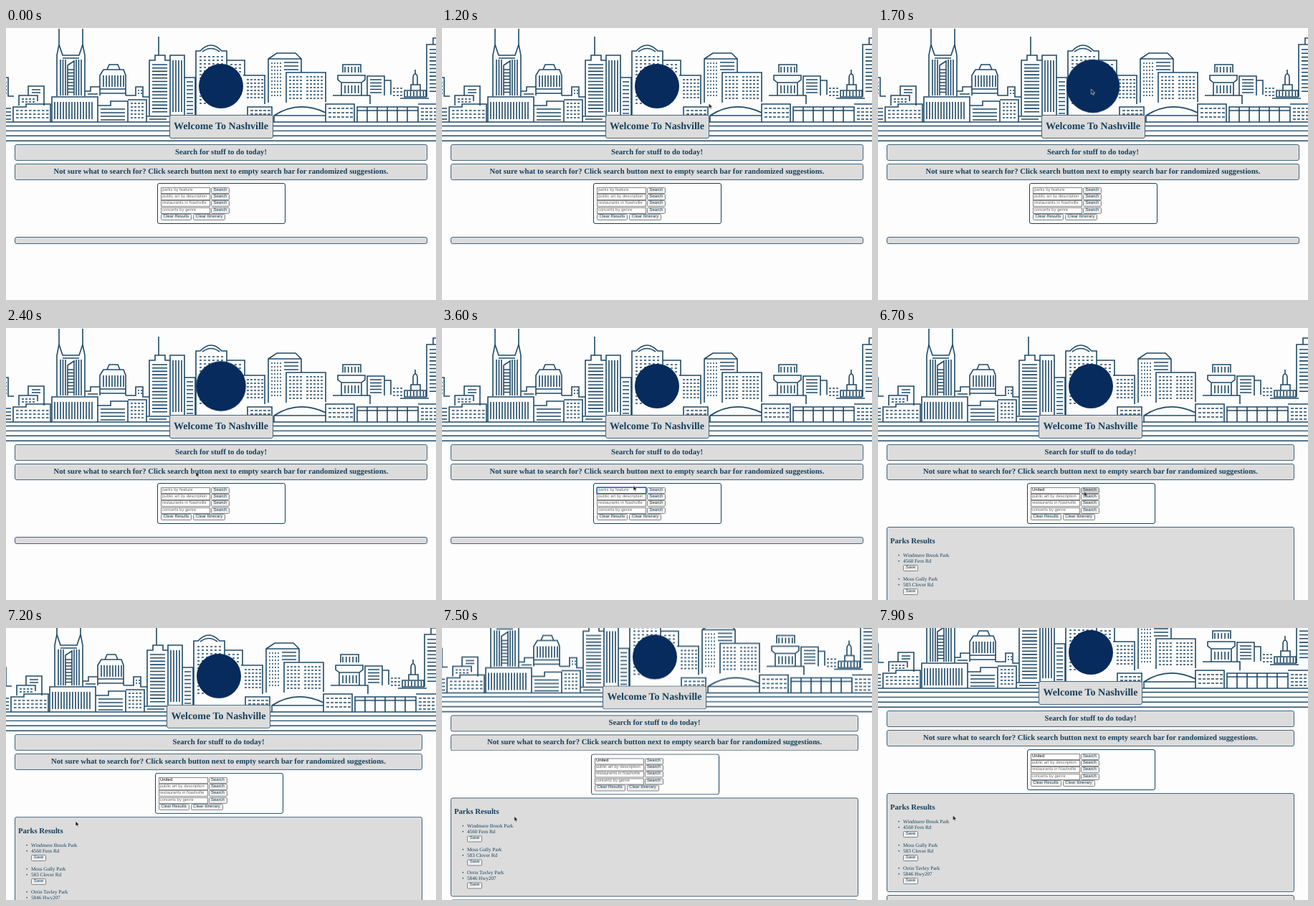
Animation of 600 by 379 pixels, one loop 8000 ms. Source, as an HTML page:

```html
<!DOCTYPE html>
<html lang="en">
<head>
<meta charset="utf-8">
<title>Welcome To Nashville</title>
<style>
:root { --ink: #17405b; --line: #1f4a68; --edge: #456479; --loop: 8s infinite; }
html, body { margin: 0; width: 100%; height: 100%; overflow: hidden; background: #fdfdfd; }
#stage { position: relative; width: 600px; height: 379px; overflow: hidden; text-rendering: geometricPrecision; }
#page {
  position: absolute; left: 0; top: 0; width: 600px; height: 500px;
  color: var(--ink); font: 7.15px/8px "Liberation Serif", "Times New Roman", serif;
  animation: narrow var(--loop) step-end, scroll var(--loop) linear;
}
#page * { box-sizing: border-box; }
#sky {
  position: absolute; left: 50%; top: 0; width: 600px; height: 162px; margin-left: -300px;
  overflow: visible; fill: none; stroke: var(--line); stroke-width: 1.6;
}
#emblem {
  position: absolute; left: 50%; top: 50px; width: 62px; height: 62px; margin-left: -31px;
  border-radius: 50%; background: #062b5c; animation: grow var(--loop) linear;
}
h1, h2, h3 { margin: 0; font-weight: bold; white-space: nowrap; }
.panel {
  position: absolute; left: 12px; right: 12px;
  background: #dcdcdc; border: 1px solid var(--edge); border-radius: 3px;
}
h1.panel {
  left: 50%; right: auto; top: 121px; width: 145px; height: 33px; margin-left: -72.5px;
  font-size: 14.05px; line-height: 31px; text-align: center;
}
h2.panel { height: 23px; font-size: 10.68px; line-height: 20.5px; text-align: center; }
#form {
  left: 50%; right: auto; top: 216px; width: 179px; height: 57px; margin-left: -89px;
  background: #fdfdfd; border-color: var(--ink);
  font: 5.95px/8px "Liberation Sans", Arial, sans-serif;
}
.row { position: absolute; left: 4px; height: 9px; white-space: nowrap; }
.field, .btn { position: absolute; top: 0; height: 9px; border: 1px solid #848484; line-height: 7.5px; }
.field { left: 0; width: 69px; padding-left: 1px; background: #fff; color: #666; }
.btn { background: #efefef; border-radius: 1.5px; text-align: center; }
.row .btn { left: 70px; width: 26px; }
#first { animation: focus var(--loop) step-end; }
#hint { animation: hint var(--loop) step-end; }
#typed { position: absolute; left: 1px; color: #000; animation: typed var(--loop) step-end; }
#typed i { font-style: normal; animation: letter var(--loop) step-end; }
#go { animation: hover var(--loop) step-end; }
#empty { top: 291px; height: 10px; animation: before var(--loop) step-end; }
#results, #more { animation: after var(--loop) step-end; }
#results { top: 277px; height: 138px; }
#more { top: 419px; height: 80px; }
h3 { position: absolute; left: 4px; top: 13px; font-size: 10.68px; line-height: 13px; }
.place { position: absolute; left: 22px; white-space: nowrap; }
.place div::before { content: "•"; position: absolute; left: -7px; }
.place .btn { top: 17px; width: 21px; font: 5.95px/7.5px "Liberation Sans", Arial, sans-serif; }
#cursor { position: absolute; left: 0; top: 0; width: 8px; height: 12px; overflow: visible; animation: move var(--loop) linear; }

@keyframes narrow { 0% { width: 600px } 81.25%, 100% { width: 593px } }
@keyframes before { 0% { visibility: visible } 81.25%, 100% { visibility: hidden } }
@keyframes after { 0% { visibility: hidden } 81.25%, 100% { visibility: visible } }
@keyframes hint { 0% { visibility: visible } 53.75%, 100% { visibility: hidden } }
@keyframes typed { 0% { opacity: 0 } 53.75%, 100% { opacity: 1 } }
@keyframes letter { 0% { visibility: hidden } 50%, 100% { visibility: visible } }
@keyframes focus {
  0%, 80.6%, 100% { box-shadow: none; border-color: #848484 }
  33.75% { box-shadow: 0 0 0 .6px #1b62c4; border-color: #1b62c4 }
}
@keyframes hover { 0%, 85%, 100% { background: #efefef } 78% { background: #d2d2d2 } }
@keyframes scroll {
  0%, 85% { transform: translateY(0) }
  87.5% { transform: translateY(-4px) }
  90% { transform: translateY(-14px) }
  92.5% { transform: translateY(-34px) }
  95%, 100% { transform: translateY(-47px) }
}
@keyframes grow {
  0%, 17.5% { transform: scale(1) }
  21.25% { transform: scale(1.2) }
  25.6% { transform: scale(1.37); animation-timing-function: ease }
  37%, 100% { transform: scale(1) }
}
@keyframes move {
  0%, 2.49% { transform: translate(640px, 338px) }
  2.5% { transform: translate(580px, 335px) }
  12.5% { transform: translate(420px, 120px) }
  17.5% { transform: translate(325px, 90px) }
  21.25% { transform: translate(297.5px, 85px) }
  23.75% { transform: translate(297px, 90px) }
  25.6% { transform: translate(290px, 125px) }
  30% { transform: translate(265px, 200px) }
  33.75%, 36.25% { transform: translate(256px, 228px) }
  41.25%, 73.2% { transform: translate(267px, 219.5px) }
  78.75% { transform: translate(290px, 228px) }
  83.75% { transform: translate(288px, 227.5px) }
  89.4%, 90% { transform: translate(97px, 269px) }
  95% { transform: translate(102px, 260px) }
  98.75%, 100% { transform: translate(104.5px, 261px) }
}
</style>
</head>
<body>
<div id="stage">
  <div id="page">
    <svg id="sky"><path id="city"/><path id="river" stroke-width="1.4"/></svg>
    <div id="emblem"></div>
    <h1 class="panel">Welcome To Nashville</h1>
    <h2 class="panel" style="top:162px">Search for stuff to do today!</h2>
    <h2 class="panel" style="top:189px">Not sure what to search for? Click search button next to empty search bar for randomized suggestions.</h2>
    <div class="panel" id="form">
      <div class="row" style="top:4.5px">
        <div class="field" id="first"><span id="typed"></span><span id="hint">parks by feature</span></div>
        <div class="btn" id="go">Search</div>
      </div>
      <div class="row" style="top:14px"><div class="field">public art by description</div><div class="btn">Search</div></div>
      <div class="row" style="top:23px"><div class="field">restaurants in Nashville</div><div class="btn">Search</div></div>
      <div class="row" style="top:32.5px"><div class="field">concerts by genre</div><div class="btn">Search</div></div>
      <div class="btn" style="left:4px;top:42px;width:43px">Clear Results</div>
      <div class="btn" style="left:49px;top:42px;width:45px">Clear Itinerary</div>
    </div>
    <div class="panel" id="empty"></div>
    <div class="panel" id="results">
      <h3>Parks Results</h3>
      <div class="place" style="top:35px"><div>Windmere Brook Park</div><div>4560 Fern Rd</div><span class="btn">Save</span></div>
      <div class="place" style="top:67.5px"><div>Moss Gully Park</div><div>583 Clover Rd</div><span class="btn">Save</span></div>
      <div class="place" style="top:100px"><div>Orrin Tavley Park</div><div>5846 Hwy207</div><span class="btn">Save</span></div>
    </div>
    <div class="panel" id="more"></div>
  </div>
  <svg id="cursor"><path d="M0 0v7.2l1.7-1.5 1.1 2.6 1.2-.5-1.1-2.5h2.2z" fill="#111" stroke="#fff" stroke-width=".6"/></svg>
</div>
<script>
const repeat = (n, draw) => Array.from({ length: n }, (_, i) => draw(i)).join('');
// n vertical strokes, n horizontal strokes, and a grid of window dashes
const v = (x, y, len, n, dx) => repeat(n, i => `M${x + i * dx} ${y}v${len}`);
const h = (x, y, len, n, dy) => repeat(n, i => `M${x} ${y + i * dy}h${len}`);
const win = (x, y, cols, rows, dx, dy, len) => repeat(cols, i => h(x + i * dx, y, len, rows, dy));

const city = [
  // west side
  'M-6 69h9v26h8', h(-4, 76, 5, 4, 5),
  'M18 108v-14h26v8M31 94v-13h22v27', h(36, 86, 12, 2, 4), win(22, 99, 4, 2, 5, 4, 3),
  'M10 131v-21h18v-4h34v25', h(-2, 112, 9, 4, 5), win(14, 115, 8, 3, 6, 5, 3.5),
  // twin-spire tower
  'M74 1v22l-3 15v57M74 23l5 15h23l5-15v-22M107 23l3 15v57', h(79, 38, 23, 2, 4),
  v(76, 44, 50, 3, 3.5), v(98, 44, 50, 3, 3.5), 'M86 94v-42l9-6v48', h(86, 58, 9, 8, 4.5),
  'M110 88h8v-6h13', h(114, 92, 14, 1, 4),
  // domed block
  'M131 94v-28l5-8h5l3-7h12l3 7h5l3 8v28M141 58h18', v(136, 66, 16, 8, 4), h(131, 85, 36, 2, 6),
  'M167 94h14v-12h10v14h9', win(184, 87, 2, 2, 4, 4, 2),
  'M64 131v-35h64v35', v(68, 103, 24, 14, 4),
  'M128 108h18v-6h24v29', h(132, 113, 34, 4, 5),
  'M170 100h26v31', win(174, 105, 4, 5, 5, 5, 3),
  // antenna tower
  'M200 122v-77h8v-7h5v-26M213 38h9v7h7v77M229 45v-7h20v86', h(204, 51, 21, 15, 4.7), v(233, 45, 72, 4, 4),
  'M249 69h15v55', h(252, 75, 9, 9, 5.5), 'M196 131v-8h32', h(200, 127, 24, 1, 5),
  // arched tower and neighbours
  'M265 124v-92h6q15-16 30 0h7v60M274 33q12-9 24 0', win(270, 40, 6, 14, 6, 5, 3),
  'M308 45h25v21M331 66h30v40', win(313, 51, 3, 3, 6, 5, 3), win(336, 72, 5, 6, 5, 5, 3),
  'M366 104v-61l12-8h26l8 8v19M366 43h46', win(370, 49, 4, 10, 4, 5, 2), h(388, 48, 20, 3, 5),
  'M391 104v-42h55v41', win(395, 68, 4, 7, 5, 5, 3), win(419, 68, 5, 7, 5, 5, 3),
  'M337 131v-21h34v21', win(341, 115, 5, 3, 6, 5, 4),
  'M374 122q34-22 72-4v13M374 131v-9h72', 'M446 131v-25h40v25', win(450, 112, 6, 3, 6, 6, 4),
  // round tower
  'M470 62v-11h25v11M463 66h38v6l-5 4h-28l-5-4zM468 76v18h28v-18M456 94h52v12',
  v(473, 54, 8, 5, 4.7), v(473, 80, 11, 5, 4.7),
  'M504 94v-27h24v27M528 73h9v20', h(508, 72, 16, 5, 4.5), win(540, 84, 3, 3, 5, 5, 3),
  // capitol
  'M571 58v6M568 79v-9q0-6 3-6t3 6v9M565 79h13v8h-13zM556 96v-9h30v9zM550 98h40', v(560, 88, 7, 6, 4.5),
  'M587 96v-73h16M596 23v-9h10', h(591, 30, 14, 12, 5.3),
  // bridge
  'M490 131v-21h85v21', v(504, 110, 21, 5, 14), h(490, 115, 85, 1, 5),
  'M575 106h34', win(579, 112, 5, 4, 6, 5, 4),
  h(-10, 131, 630, 1, 0)
];
document.getElementById('city').setAttribute('d', city.join(''));
document.getElementById('river').setAttribute('d', h(-10, 136.5, 630, 4, 6.9));

// each letter appears at its own moment of the loop
const times = [4300, 4600, 4800, 5000, 5300, 5700];
document.getElementById('typed').innerHTML = [...'United']
  .map((c, i) => `<i style="animation-delay:${times[i] - 12000}ms">${c}</i>`).join('');
</script>
</body>
</html>
```
